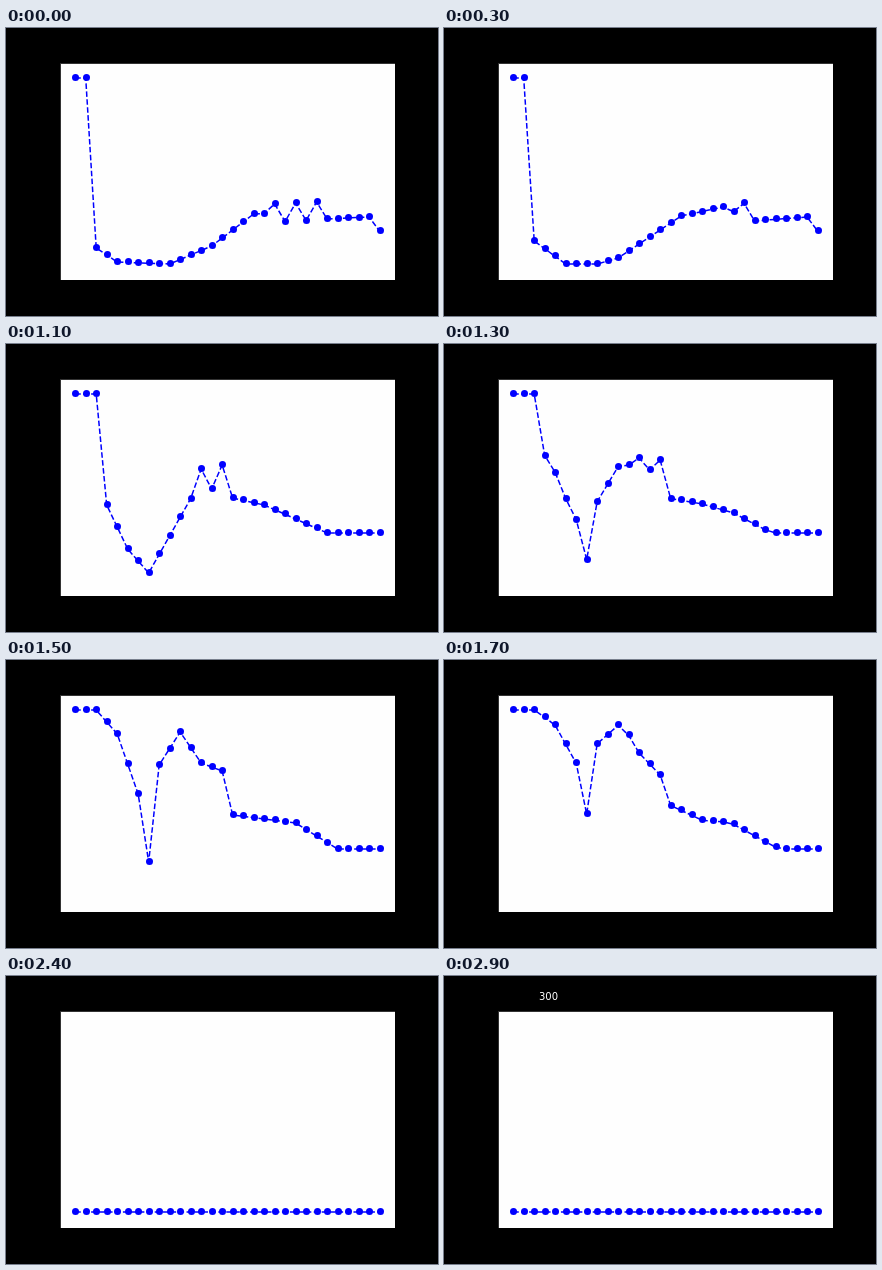
These frames come from a looping animation (432 px wide and 288 px high, 3 s). An HTML page with a canvas:

```html
<!DOCTYPE html>
<html lang="en">
<head>
<meta charset="utf-8">
<title>Dashed curve</title>
<style>
  html, body { margin: 0; width: 100%; height: 100%; overflow: hidden; background: #000; }
  canvas { display: block; }
</style>
</head>
<body>
<canvas width="432" height="288"></canvas>
<script>
const ctx = document.querySelector('canvas').getContext('2d');
const LOOP = 3000, STEP = 100, COLLAPSE = 2300, LABEL = 2900;
const COUNT = 30, TOP = 49, FLOOR = 235, TAIL = 188;

// Each pose is a bent line through a few [index, y] knots, flat beyond its ends.
// A crest zigzags by `size` from index `first` to `last`, starting upwards.
const poses = [
  { at: 0, crest: { first: 19, last: 23, size: 9 },
    knots: [[1, TOP], [2, 219], [4, 233], [9, FLOOR], [13, 217], [17, 185], [23, 182], [24, 190], [28, TAIL], [29, 202]] },
  { at: 300, crest: { first: 22, last: 22, size: 13 },
    knots: [[1, TOP], [2, 212], [5, FLOOR], [8, FLOOR], [10, 229], [16, 187], [20, 178], [23, 192], [28, TAIL], [29, 202]] },
  { at: 700, crest: { first: 17, last: 17, size: 17 },
    knots: [[1, TOP], [2, 195], [4, 222], [6, 234], [8, 233], [10, 215], [12, 183], [17, 170], [24, TAIL]] },
  { at: 1100, crest: { first: 12, last: 14, size: 11 },
    knots: [[2, TOP], [3, 160], [5, 204], [7, 228], [12, 135], [14, 131], [15, 153], [18, 160], [24, TAIL]] },
  { at: 1500,
    knots: [[2, TOP], [4, 73], [6, 133], [7, 201], [8, 104], [10, 71], [12, 102], [14, 110], [15, 154], [21, 162], [25, TAIL]] },
  { at: 2000,
    knots: [[3, TOP], [6, 56], [7, 81], [8, 51], [11, 56], [14, 120], [18, 161], [20, 161], [26, TAIL]] },
];

const mix = (a, b, k) => a + (b - a) * k;

function alongKnots(knots, i) {
  const next = knots.findIndex(([index]) => index >= i);
  if (next < 0) return knots.at(-1)[1];
  if (next === 0) return knots[0][1];
  const [i0, y0] = knots[next - 1], [i1, y1] = knots[next];
  return mix(y0, y1, (i - i0) / (i1 - i0));
}

function zigzag(crest, i) {
  if (!crest || i < crest.first || i > crest.last) return 0;
  return (i - crest.first) % 2 ? crest.size : -crest.size;
}

const poseY = (pose, i) => alongKnots(pose.knots, i) + zigzag(pose.crest, i);

function pointY(i, t) {
  if (t >= COLLAPSE) return FLOOR;
  const next = poses.findIndex(pose => pose.at > t);
  if (next < 0) return poseY(poses.at(-1), i);
  const from = poses[next - 1], to = poses[next];
  return mix(poseY(from, i), poseY(to, i), (t - from.at) / (to.at - from.at));
}

function rect(color, x, y, w, h) {
  ctx.fillStyle = color;
  ctx.fillRect(x, y, w, h);
}

function draw(t) {
  rect('#000', 0, 0, 432, 288);
  rect('#333', 54, 35, 335, 217);
  rect('#fefefe', 55, 36, 334, 216);
  if (t >= LABEL) {
    ctx.font = '10px "DejaVu Sans", sans-serif';
    ctx.fillText('300', 95, 24);
  }

  const points = Array.from({ length: COUNT }, (_, i) => [69.22 + 10.495 * i, pointY(i, t)]);
  ctx.strokeStyle = ctx.fillStyle = '#00f';
  ctx.lineWidth = 1.5;
  ctx.lineJoin = 'round';
  ctx.setLineDash([5.55, 2.4]);
  ctx.beginPath();
  for (const [x, y] of points) ctx.lineTo(x, y + 1);
  ctx.stroke();
  // Markers sit on whole pixels, the line does not.
  for (const [x, y] of points) {
    ctx.beginPath();
    ctx.arc(Math.round(x) + 0.5, Math.round(y) + 0.5, 3.5, 0, 2 * Math.PI);
    ctx.fill();
  }
}

const start = performance.now();
function tick() {
  const t = (performance.now() - start) % LOOP;
  draw(Math.floor(t / STEP) * STEP);
  requestAnimationFrame(tick);
}
tick();
</script>
</body>
</html>
```
